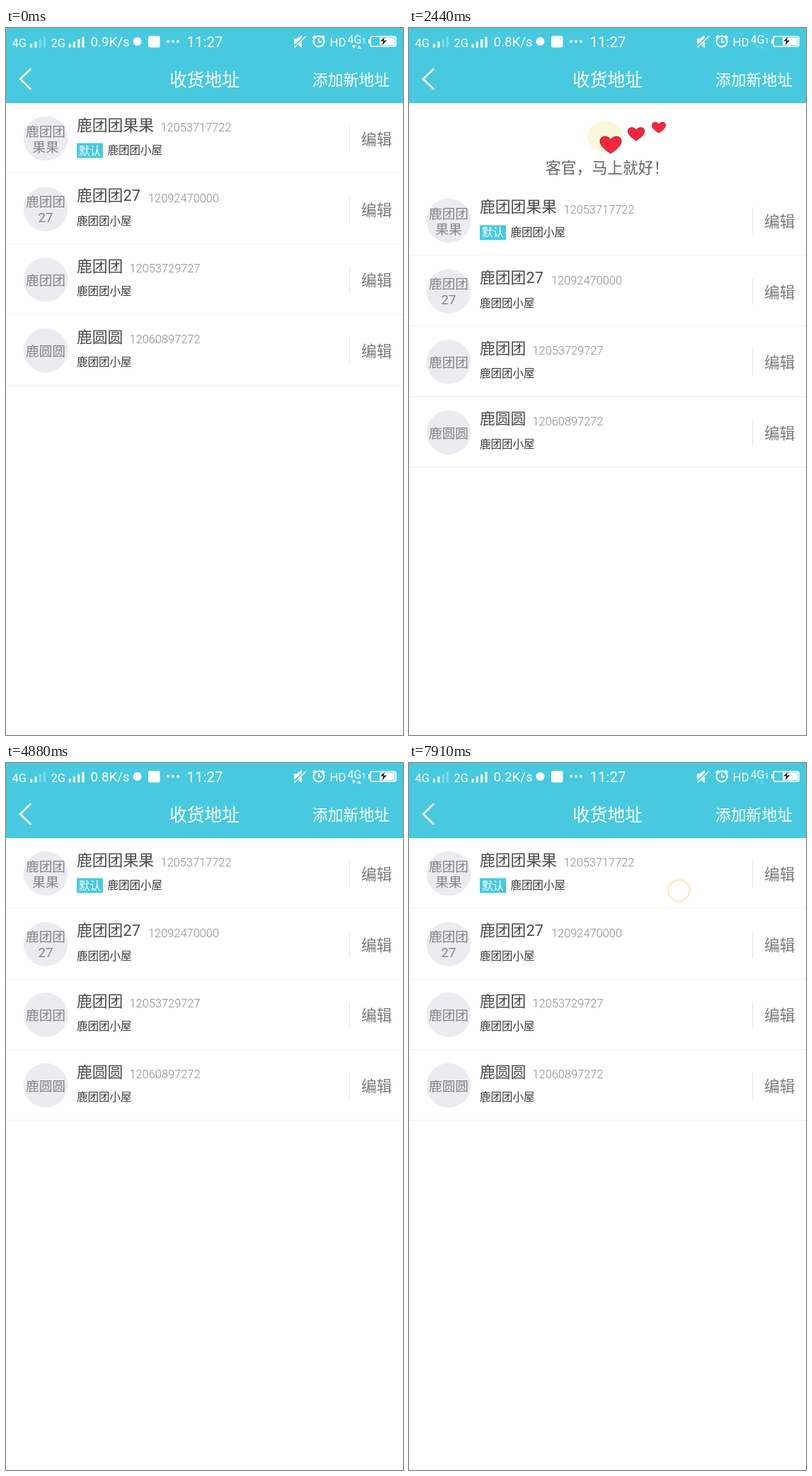
These frames come from a looping animation (561x998 px, 7990 ms). An HTML page:

```html
<!DOCTYPE html>
<html lang="zh-CN">
<head>
<meta charset="utf-8">
<title>收货地址</title>
<style>
  html, body { margin: 0; width: 100%; height: 100%; overflow: hidden; background: #fff; }
  svg { display: block; width: 100%; height: 100%; }
  text { font-family: Roboto, "Noto Sans CJK SC", "Noto Sans CJK", sans-serif; font-weight: 300; white-space: pre; }
  .mid { text-anchor: middle; }
  .name { font-size: 21.8px; font-weight: 400; fill: #484848; }
  .phone { font-size: 16.4px; fill: #888; }
  .addr { font-size: 15.5px; fill: #3a3a3a; }
  .face { font-size: 18.7px; font-weight: 400; fill: #858585; }
  .edit { font-size: 21.7px; fill: #7a7a7a; }
  .white, .bar text { fill: #fff; }
  .status text { font-weight: 400; }
</style>
</head>
<body>
<svg viewBox="0 0 561 998" preserveAspectRatio="none">
  <defs>
    <path id="heart" d="M0 13C-8 8-15 2-15-4C-15-12-4-13 0-6C4-13 15-12 15-4C15 2 8 8 0 13Z"
          fill="#f5263f" stroke="#8e1626"/>
  </defs>
  <g id="list">
    <g id="refresh">
      <ellipse cx="277" cy="38" rx="25" ry="22" fill="#fcf7da"/>
      <use href="#heart" x="285" y="48"/>
      <use class="hop" href="#heart" transform="translate(321 33) scale(.78)"/>
      <use class="hop" href="#heart" transform="translate(353 24) scale(.64)"/>
      <text x="193" y="89.5" font-size="21.8" fill="#666">客官，马上就好！</text>
    </g>
  </g>
  <g class="bar">
    <rect width="561" height="106" fill="#48c9df"/>
    <path d="M34.500 58L20 72L34.500 86" fill="none" stroke="#fff" stroke-width="2.500" stroke-linecap="round"/>
    <text class="mid" x="280.5" y="81.500" font-size="24.700">收货地址</text>
    <text x="433" y="80.500" font-size="21.800">添加新地址</text>
    <g class="status" fill="#fff">
      <text x="8.500" y="27" font-size="16.500">4G</text>
      <g id="signal"></g>
      <text x="63.500" y="27" font-size="16.500">2G</text>
      <text id="speed" x="119.500" y="26" font-size="18.800"></text>
      <circle cx="185.500" cy="19" r="6"/>
      <rect x="201" y="11" width="16.500" height="16.500" rx="2.500"/>
      <circle cx="229" cy="19" r="2"/><circle cx="236" cy="19" r="2"/><circle cx="243" cy="19" r="2"/>
      <text x="255.500" y="26.500" font-size="20.500">11:27</text>
      <path d="M407 15H411L418 10V28L411 23H407Z"/>
      <path d="M406 28L424 11" stroke="#48c9df" stroke-width="4"/>
      <path d="M407.500 27.500L424 11.500" stroke="#fff" stroke-width="1.600"/>
      <g fill="none" stroke="#fff" stroke-width="2">
        <circle cx="442" cy="19" r="7.500"/>
        <path d="M442 14.500V19.500H446M433.500 14L437 10.500M450.500 14L447 10.500"/>
      </g>
      <text x="457.500" y="25.500" font-size="16.800">HD</text>
      <text x="482.500" y="22" font-size="16">4G</text>
      <text x="502.500" y="22" font-size="11.500">1</text>
      <path id="arrows" d="M488.500 24.500H494.500L491.500 29ZM496 29H502L499 24.500Z"/>
      <rect x="512" y="16" width="2" height="6"/>
      <rect x="515" y="12" width="36" height="14" rx="2.500" fill="none" stroke="#fff" stroke-width="1.600"/>
      <rect x="528" y="13.500" width="21.500" height="11"/>
      <path d="M529 18.500L535 13L533.800 17.500H538L531.500 24.500L533 18.500Z" fill="#222"/>
    </g>
  </g>
  <g id="ring" fill="none">
    <circle r="15.500" stroke="#fff6dc" stroke-width="4" opacity=".7"/>
    <circle r="14.800" fill="#fff" stroke="#f8e6bb" stroke-width="1.600"/>
  </g>
</svg>
<script>
const LOOP = 7990, STEP = LOOP / 95, PITCH = 99.7, TOP = 106, OPEN = 131, DAMPING = .35;
const $ = id => document.getElementById(id);

const people = [
  { name: '鹿团团果果', phone: '12053717722', phoneX: 218.5, face: ['鹿团团', '果果'], main: true },
  { name: '鹿团团27', phone: '12092470000', phoneX: 201, face: ['鹿团团', '27'] },
  { name: '鹿团团', phone: '12053729727', phoneX: 174.5, face: ['鹿团团'] },
  { name: '鹿圆圆', phone: '12060897272', phoneX: 174.5, face: ['鹿圆圆'] }
];

const label = (cls, x, y, s) => `<text class="${cls}" x="${x}" y="${y}">${s}</text>`;

function rowMarkup(p, i) {
  const faceTop = 57.7 - 11 * (p.face.length - 1);
  const tag = p.main
    ? '<rect x="100" y="56.500" width="37" height="21" fill="#48c9df"/>' + label('addr white', 103, 72.5, '默认')
    : '';
  return `<g transform="translate(0 ${TOP + i * PITCH})"><g class="row">
    <rect width="561" height="${PITCH}" fill="#fff"/>
    <rect y="${PITCH - 1}" width="561" height="1" fill="#ededed"/>
    <circle cx="56" cy="50" r="31.300" fill="#ebebf1"/>
    ${p.face.map((s, k) => label('face mid', 56, faceTop + 22 * k, s)).join('')}
    ${label('name', 100, 38.5, p.name)}${label('phone', p.phoneX, 40, p.phone)}
    ${tag}${label('addr', p.main ? 143.5 : 100, 72, '鹿团团小屋')}
    <rect x="485" y="31.500" width="1" height="38" fill="#e2e2e2"/>
    ${label('edit', 502, 59, '编辑')}
    <rect x="561" width="${OPEN}" height="${PITCH}" fill="#f00"/>
    ${label('edit mid white', 627.5, 59, '删除')}
  </g></g>`;
}

const bars = (x, lit) => [0, 1, 2, 3].map(k => {
  const h = 5 + 3.3 * k;
  return `<rect x="${x + k * 6.3}" y="${27.5 - h}" width="3.200" height="${h}" opacity="${k < lit ? 1 : .3}"/>`;
}).join('');

$('list').insertAdjacentHTML('beforeend', people.map(rowMarkup).join(''));
$('signal').innerHTML = bars(34, 2) + bars(88.5, 4);
const rows = document.querySelectorAll('.row');
const hops = document.querySelectorAll('.hop');

const clamp = (v, lo, hi) => Math.min(hi, Math.max(lo, v));
const progress = (t, a, b) => clamp((t - a) / (b - a), 0, 1);
const easeOut = f => 1 - (1 - f) ** 3;

// anchor: finger height at which the list is at rest; dip: how far a drag bows upwards
const pulls = [
  { start: 160, end: 1450, from: [225, 468], to: [248, 799], ease: easeOut, anchor: 468, release: 2540 },
  { start: 3111, end: 4270, from: [270, 598], to: [301, 619], dip: 105, anchor: 646, release: 4270 }
];
const swipes = [
  { row: 0, start: 5030, end: 5390, from: [430, 158], to: [280, 160], ease: easeOut, release: 5846 },
  { row: 3, start: 6140, end: 6440, from: [430, 455], to: [280, 457], ease: easeOut, release: 6540 },
  { row: 0, start: 6880, end: 7200, from: [410, 160], to: [260, 164], ease: easeOut, release: 7640 }
];
const others = [
  { start: 5790, end: 5960, from: [319, 374], to: [319, 374] },
  { start: 7620, end: LOOP, from: [250, 178], to: [383, 180], ease: easeOut }
];
const touches = [...pulls, ...swipes, ...others];

function finger(g, t) {
  const f = progress(t, g.start, g.end), e = g.ease ? g.ease(f) : f;
  const [x, y] = g.from.map((v, k) => v + (g.to[k] - v) * e);
  return [x, y - (g.dip || 0) * Math.sin(Math.PI * f)];
}

// Sums what each gesture contributes, fading out once it is released.
const settle = (gestures, t, fade, value) => gestures
  .filter(g => t >= g.start)
  .reduce((sum, g) => sum + value(g) * (1 - progress(t, g.release, g.release + fade)), 0);

function draw(time) {
  const t = Math.floor(time % LOOP / STEP + .1) * STEP;
  const offset = settle(pulls, t, 240, g => DAMPING * (finger(g, t)[1] - g.anchor));
  $('list').setAttribute('transform', `translate(0 ${offset})`);
  $('refresh').style.display = offset > 0 ? '' : 'none';
  rows.forEach((row, i) => {
    const own = swipes.filter(g => g.row === i);
    const shift = settle(own, t, 170, g => clamp(finger(g, t)[0] - g.from[0], -OPEN, 0));
    row.setAttribute('transform', `translate(${shift} 0)`);
  });

  const hearts = Math.floor(t / (STEP * 2)) % 3;
  hops.forEach((h, k) => h.style.display = k < hearts ? '' : 'none');

  const touch = touches.find(g => t >= g.start && t <= g.end);
  $('ring').style.display = touch ? '' : 'none';
  if (touch) $('ring').setAttribute('transform', `translate(${finger(touch, t).join(' ')})`);

  $('speed').textContent = (t < 2000 ? '0.9' : t < 5400 ? '0.8' : '0.2') + 'K/s';
  $('arrows').setAttribute('opacity', t % 4600 < 500 ? 1 : .18);
}

const start = performance.now();
(function tick() {
  draw(performance.now() - start);
  requestAnimationFrame(tick);
})();
</script>
</body>
</html>
```
